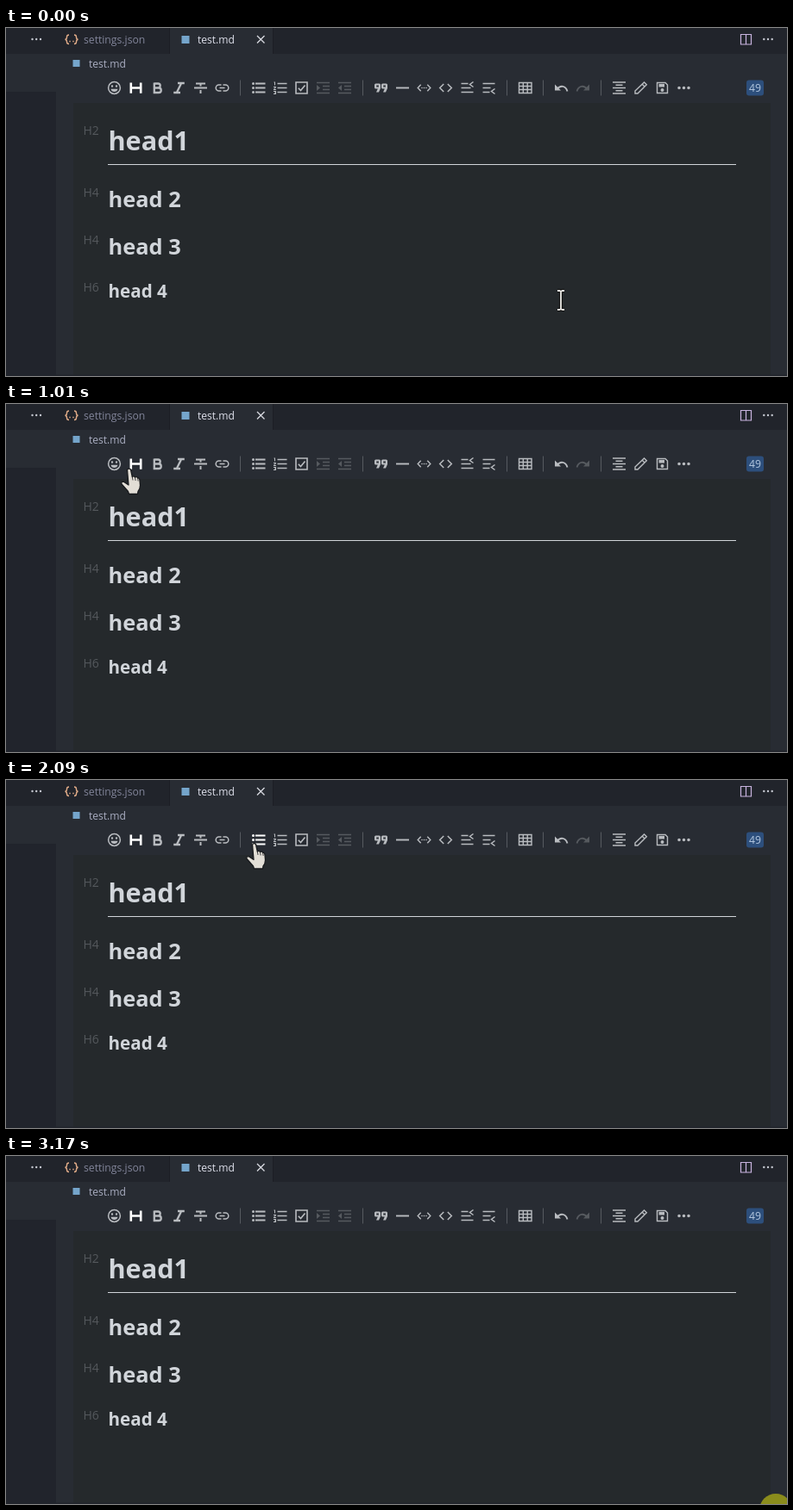
Write an HTML page that moves like this. It is 905 px wide and 404 px high and loops after 3340 ms.

```html
<!DOCTYPE html>
<html lang="en">
<head>
<meta charset="utf-8">
<title>Markdown editor</title>
<style>
html, body { margin: 0; width: 100%; height: 100%; overflow: hidden; background: #282c34; }
svg { display: block; width: 905px; height: 404px; }
text { font-family: "Open Sans", "Noto Sans", sans-serif; white-space: pre; }
.head { font-weight: 700; fill: #d1d5da; }
.level { font-size: 14px; fill: #54585c; }
.icon { color: #b9bcc0; fill: none; stroke: currentColor; }
.icon .solid { fill: currentColor; stroke: none; }
.icon.off { color: #565a5f; }
.icon.on { color: #fff; }
.tip text { font: 11px "Liberation Sans", Arial, sans-serif; fill: #fff; }
.cursor { stroke-linejoin: round; }
</style>
</head>
<body>
<svg viewBox="0 0 905 404">
  <rect width="905" height="404" fill="#282c33"/>
  <rect width="905" height="30" fill="#21242b"/>
  <rect x="190" width="119" height="30" fill="#282c33"/>
  <path d="M189.5 0V30M309.5 0V30" stroke="#1c1e25"/>
  <rect y="74" width="58" height="330" fill="#21242c"/>
  <rect x="78" y="87" width="808" height="317" fill="#25292c"/>
  <rect y="402.5" width="905" height="1.5" fill="#21242c"/>

  <g fill="#c5c8d0">
    <circle cx="30.5" cy="13" r="1.2"/><circle cx="35.2" cy="13" r="1.2"/><circle cx="40" cy="13" r="1.2"/>
    <circle cx="878.3" cy="13" r="1.2"/><circle cx="883" cy="13" r="1.2"/><circle cx="887.7" cy="13" r="1.2"/>
  </g>
  <g fill="none" stroke="#e0ab88" stroke-width="1.4">
    <path d="M73 8q-2.5 0-2.5 2.5t-2 2.7q2 .3 2 2.8t2.5 2.5M79 8q2.5 0 2.5 2.5t2 2.7q-2 .3-2 2.8t-2.5 2.5"/>
    <path d="M73.3 15.5h1.4M77.3 15.5h1.4"/>
  </g>
  <rect x="203.500" y="9" width="9" height="9" fill="#75a5cb"/>
  <rect x="77.500" y="37" width="8" height="8" fill="#75a5cb"/>
  <text x="90" y="18" font-size="12.2" fill="#82859a">settings.json</text>
  <text x="222" y="18" font-size="12.1" fill="#dfe1ec">test.md</text>
  <text x="96" y="46" font-size="12.1" fill="#aaaec2">test.md</text>
  <path d="M291 9l8.500 8.500M299.500 9L291 17.500" stroke="#d9dbe2" stroke-width="1.300"/>
  <path d="M851.500 7.500h12v11.500h-12zM857.500 7.500v11.500" fill="none" stroke="#c9b4e0" stroke-width="1.200"/>

  <path d="M271.500 60.500v18M413.500 60.500v18M580.500 60.500v18M622.500 60.500v18M689.500 60.500v18" stroke="#565a60"/>
  <g id="bar"></g>
  <rect x="858" y="60.500" width="20" height="18" rx="3" fill="#2d4f7c"/>
  <text x="868" y="74" font-size="12.2" text-anchor="middle" fill="#b4c8e0">49</text>

  <text class="level" x="89.500" y="124">H2</text>
  <text class="level" x="89.500" y="196">H4</text>
  <text class="level" x="89.500" y="251">H4</text>
  <text class="level" x="89.500" y="306">H6</text>
  <text class="head" x="118.500" y="142" font-size="30.6">head1</text>
  <text class="head" x="118.500" y="208" font-size="25.4">head 2</text>
  <text class="head" x="118.500" y="263" font-size="25.4">head 3</text>
  <text class="head" x="118.500" y="313" font-size="20.6">head 4</text>
  <rect x="118" y="158" width="728" height="1" fill="#d1d5da"/>

  <g class="tip" id="emojiTip">
    <path d="M120.500 92l5-5 5 5z" fill="#3b3e43"/>
    <rect x="73.500" y="92" width="105" height="26" rx="3" fill="#3b3e43"/>
    <text x="81" y="109">Смайлы &lt;Ctrl+E&gt;</text>
  </g>
  <g class="tip" id="linkTip">
    <path d="M245.500 92l5-5 5 5z" fill="#3b3e43"/>
    <rect x="200" y="92" width="101" height="26" rx="3" fill="#3b3e43"/>
    <text x="208" y="109">Ссылка &lt;Ctrl+K&gt;</text>
  </g>

  <circle id="halo" cx="892" cy="411" r="19" fill="#8b8c1c"/>
  <g class="cursor" id="beam" fill="none">
    <path d="M-4-11H-1.500L0-10 1.500-11H4M0-10V10M-4 11H-1.500L0 10 1.500 11H4" stroke="#111" stroke-width="4"/>
    <path d="M-4-11H-1.500L0-10 1.500-11H4M0-10V10M-4 11H-1.500L0 10 1.500 11H4" stroke="#eceae6" stroke-width="1.800"/>
  </g>
  <g class="cursor" id="hand" fill="#e2ded6" stroke="#17191c" stroke-width="1.300">
    <path d="M7.500 2Q9-.5 11.500 1.500L13.300 10Q15 8.500 16.500 10.500 18.500 9.300 19.700 11.500 21.600 11 22 14L22.500 20Q22.500 24 20 27L19.500 30H9.500L8.500 27 1 18.500Q.2 15 3.700 16L9 19.500Z"/>
    <path d="M13.300 10l.7 4M16.500 10.500l.6 4M19.700 11.500l.4 3.500" fill="none" stroke-width=".8"/>
  </g>
  <path class="cursor" id="arrow" d="M.7 1V24.500L6 19.500 9.800 28 13.700 26.300 10 18H18Z" fill="#e2ded6" stroke="#17191c" stroke-width="1.300"/>
</svg>
<script>
const LOOP = 3340;
const $ = id => document.getElementById(id);

// Toolbar icons around their centre: x, stroke width, lines, solid parts, class
const rows = (x0, x1) => [-5, 0, 5].map(y => `M${x0} ${y}H${x1}`).join('');
const dot = (x, y, r) => `M${x - r} ${y}a${r} ${r} 0 1 0 ${2 * r} 0a${r} ${r} 0 1 0 ${-2 * r} 0z`;
const dentLines = 'M-7.500-6H7.500M-.5-2H7.500M-.5 2H7.500M-7.500 6H7.500';
const icons = [
  [125, 1.5, dot(0, 0, 6.9), dot(-2.5, -2, 1.2) + dot(2.5, -2, 1.2) + 'M-4 1.300H4A4.100 4.100 0 0 1-4 1.300z'],
  [150, 2.6, 'M-5.700-6V6.300M5.700-6V6.300M-5.700 0H5.700', '', 'on'],
  [175, 2.3, 'M-3.700-5H.7a2.500 2.500 0 0 1 0 5H-3.700M-3.700 0H1.500a2.700 2.700 0 0 1 0 5.500H-3.700V-6', ''],
  [200, 2.3, 'M-1.500-5.500H6.300M-6.300 5.500H1.500M2.700-5.500L-2.700 5.500', ''],
  [225, 2, 'M-5.500-5H5.500M0-5V-2M-7.500 0H7.500M0 2.500V6.500', ''],
  [250, 1.5, 'M-1-3.500H-3.800a3.500 3.500 0 0 0 0 7H-1M1-3.500H3.800a3.500 3.500 0 0 1 0 7H1M-3 0H3', ''],
  [292, 2, rows(-3.5, 8), [-5, 0, 5].map(y => dot(-6, y, 1.5)).join('')],
  [317, 1.5, rows(-3, 8), 'M-7-7h1.500v4h-1v-3H-7zM-7.500-1.500h3v1l-1.800 2h1.800v1h-3v-1l1.800-2h-1.800zM-7.500 3.500h3v4h-3v-1h2V6h-1V5h1v-.5h-2z'],
  [342, 1.6, 'M-6.500-6.500H6.500V6.500H-6.500zM-3.700.2L-1 3 4-3', ''],
  [367, 1.5, dentLines, 'M-7.500-3.500L-3.500 0-7.500 3.500z', 'off'],
  [392, 1.5, dentLines, 'M-3.500-3.500L-7.500 0-3.500 3.500z', 'off'],
  [434, 1, '', [-7.5, .5].map(x => `M${x + 1.5}-5h4q1.500 0 1.500 1.500V.5l-2 4.500h-3l1.800-4h-2.300q-1.500 0-1.500-1.500v-3q0-1.500 1.500-1.500zm.8 2v2h2.500v-2z`).join('')],
  [459, 1.9, 'M-7.500 0H7.500', ''],
  [484, 1.4, 'M-3.800-3.800L-7.300 0-3.800 3.800M3.800-3.800L7.300 0 3.800 3.800', [-2.5, 0, 2.5].map(x => dot(x, 0, .8)).join('')],
  [509, 1.5, 'M-2.300-4.500L-6.800 0-2.300 4.500M2.300-4.500L6.800 0 2.300 4.500', ''],
  [534, 1.5, 'M-7-5H1M-7 0H4M-7 5H7M7-7L3-4 7-1', ''],
  [559, 1.5, 'M-7-5H7M-7 0H2M-7 5H1M7 1L3 4 7 7', ''],
  [601, 1.4, 'M-7-6H7.500V6H-7zM-7-2H7.500M-7 2H7.500M-2.200-6V6M2.700-6V6', ''],
  [643, 1.9, 'M-5 1.500C-1-3.500 5-2.500 7 4', 'M-7.500-4V3H-.5z'],
  [668, 1.9, 'M5 1.500C1-3.500-5-2.500-7 4', 'M7.500-4V3H.5z', 'off'],
  [710, 1.5, 'M-7.500-6.500H7.500M-4-3.200H4M-7.500 0H7.500M-4 3.200H4M-7.500 6.500H7.500', ''],
  [735, 1.4, 'M-6.500 6.500V3.500L4-6.500 6.800-3.700-3.500 6.500zM1.700-4.200L4.500-1.400', ''],
  [760, 1.4, 'M-6-6H3.500L6-3.500V6H-6z', 'M-4-4.500H2.500V-1H-4z' + dot(0, 2.5, 2)],
  [785, 1, '', [-5.5, 0, 5.5].map(x => dot(x, 0, 1.8)).join('')]
];
$('bar').innerHTML = icons.map(([x, width, lines, solid, cls = '']) =>
  `<g class="icon ${cls}" transform="translate(${x + .5} 69.500)" stroke-width="${width}">` +
  `<path d="${lines}"/><path class="solid" d="${solid}"/></g>`).join('');
const buttons = [...$('bar').children];

// Pointer steps: time, shape, x, y, hovered button, tooltip, tooltip opacity
const steps = [
  [0, 'beam', 643, 316],
  [70, 'beam', 632, 312],
  [150, 'beam', 565, 286],
  [230, 'beam', 440, 235],
  [310, 'beam', 310, 180],
  [390, 'beam', 205, 137],
  [470, 'beam', 140, 114],
  [550, 'beam', 113, 105],
  [610, 'hand', 108, 82, 0],
  [690, 'hand', 108, 77, 0],
  [780, 'hand', 108.5, 74.5, 0, 'emojiTip', .2],
  [860, 'hand', 110, 74.5, 0, 'emojiTip', .75],
  [930, 'hand', 120, 74.5, 0, 'emojiTip', 1],
  [1010, 'hand', 133, 74.5, 1],
  [1090, 'hand', 158, 73, 2],
  [1160, 'hand', 181, 72, 3],
  [1240, 'hand', 208, 71, 4],
  [1320, 'hand', 229, 70, 5],
  [1390, 'hand', 239, 70, 5, 'linkTip', .12],
  [1480, 'hand', 243, 70, 5, 'linkTip', .75],
  [1560, 'hand', 245.5, 69.5, 5, 'linkTip', 1],
  [1870, 'hand', 248, 68.5, 5, 'linkTip', 1],
  [2090, 'hand', 278, 73, 6],
  [2170, 'hand', 300, 76, 7],
  [2240, 'hand', 330, 79, 8],
  [2320, 'beam', 382, 98],
  [2400, 'beam', 438, 108],
  [2480, 'beam', 640, 190],
  [2560, 'arrow', 884, 292],
  [2630, 'arrow', 880, 318],
  [2710, 'arrow', 874, 348],
  [2780, 'arrow', 871, 372],
  [2860, 'arrow', 876, 392],
  [2940, 'arrow', 892, 411]
];
const shapes = ['beam', 'hand', 'arrow'];
const tips = ['emojiTip', 'linkTip'];

function draw(time) {
  const [, shape, x, y, hover, tip, alpha] = steps.findLast(s => s[0] <= time);
  for (const id of shapes) {
    $(id).setAttribute('visibility', id === shape ? 'visible' : 'hidden');
  }
  $(shape).setAttribute('transform', `translate(${x} ${y})`);
  for (const id of tips) $(id).setAttribute('opacity', id === tip ? alpha : 0);
  buttons.forEach((b, i) => b.classList.toggle('on', i === 1 || i === hover));
  $('halo').setAttribute('visibility', time >= 3170 ? 'visible' : 'hidden');
}

const start = performance.now();
function tick() {
  draw((performance.now() - start) % LOOP);
  requestAnimationFrame(tick);
}
tick();
</script>
</body>
</html>
```
